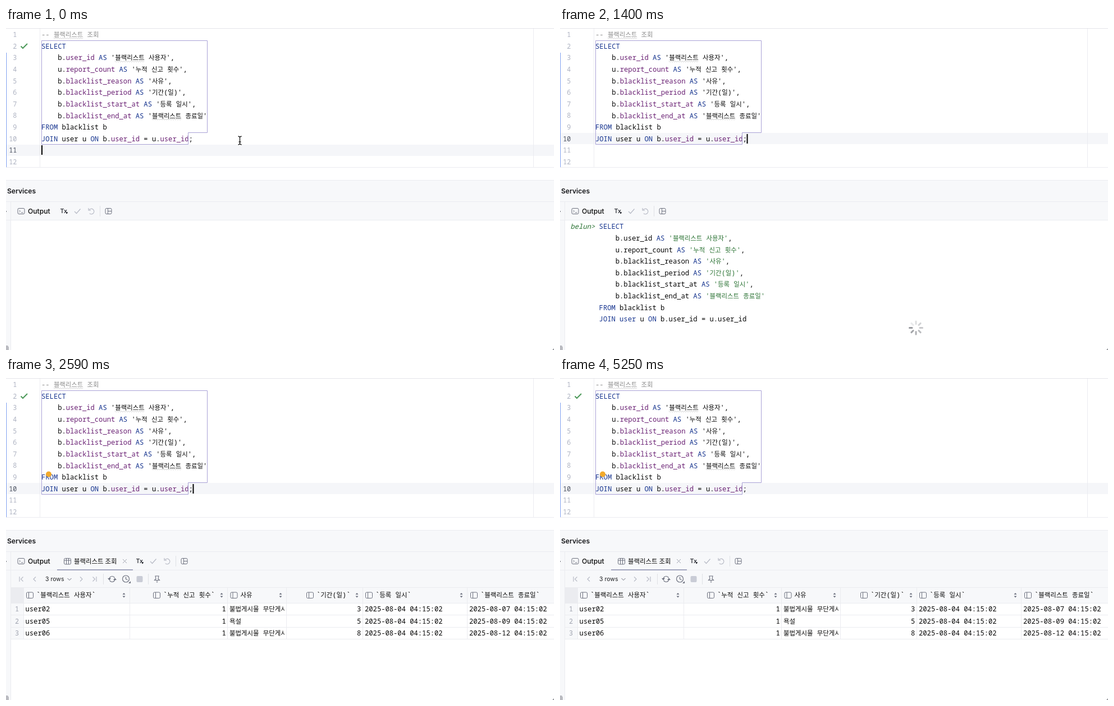
An HTML page with a canvas that plays this animation: 976 px wide and 574 px high, repeating every 5.74 s.

```html
<!DOCTYPE html>
<html lang="ko">
<head>
<meta charset="utf-8">
<style>
html, body { margin: 0; width: 100%; height: 100%; overflow: hidden; background: #fff; }
canvas { display: block; }
</style>
</head>
<body>
<canvas id="stage" width="976" height="574"></canvas>
<script>
const ctx = document.getElementById('stage').getContext('2d');
const LOOP = 5740, STEP = 70, ROW = 20.65, CHAR = 7.3;
const INK = '#080808', KEYWORD = '#17358f', FIELD = '#6a2174', STRING = '#2a7233';
const LINE = '#ebecf0', PANEL = '#f7f8fa', ICON = '#6c707e', FAINT = '#b8bbc6';
const MONO = '"Noto Sans Mono", "DejaVu Sans Mono", monospace';
const HANGUL = '"Noto Sans CJK KR", "Noto Sans CJK JP", "Noto Sans CJK", sans-serif';
const UI = 'Inter, sans-serif';

const select = [
  'SELECT',
  "    b.user_id AS '블랙리스트 사용자',",
  "    u.report_count AS '누적 신고 횟수',",
  "    b.blacklist_reason AS '사유',",
  "    b.blacklist_period AS '기간(일)',",
  "    b.blacklist_start_at AS '등록 일시',",
  "    b.blacklist_end_at AS '블랙리스트 종료일'",
  'FROM blacklist b',
  'JOIN user u ON b.user_id = u.user_id'
];
const records = [
  ['user02', '1', '불법게시물 무단게시', '3', '07'],
  ['user05', '1', '욕설', '5', '09'],
  ['user06', '1', '불법게시물 무단게시', '8', '12']
];

function rect(x, y, w, h, color) {
  ctx.fillStyle = color;
  ctx.fillRect(x, y, w, h);
}

function path(points, color, width = 1, close = false) {
  ctx.beginPath();
  points.forEach(([x, y], i) => i ? ctx.lineTo(x, y) : ctx.moveTo(x, y));
  if (close) ctx.closePath();
  ctx.strokeStyle = color;
  ctx.lineWidth = width;
  ctx.stroke();
}

function shape(points, color) {
  ctx.beginPath();
  points.forEach(([x, y]) => ctx.lineTo(x, y));
  ctx.fillStyle = color;
  ctx.fill();
}

function arc(x, y, r, from, to, color, width = 1) {
  ctx.beginPath();
  ctx.arc(x, y, r, from, to);
  ctx.strokeStyle = color;
  ctx.lineWidth = width;
  ctx.stroke();
}

function box(x, y, w, h, color) {
  ctx.beginPath();
  ctx.roundRect(x, y, w, h, 2);
  ctx.strokeStyle = color;
  ctx.lineWidth = 1;
  ctx.stroke();
}

// Hangul is set a little smaller than Latin; y is the middle of the line. Returns the end x.
function text(str, x, y, color = INK, { family = MONO, size = 12.17, style = '500', align = 'left' } = {}) {
  const runs = str.match(/[가-힣]+|[^가-힣]+/g).map(run => {
    const font = /[가-힣]/.test(run) ? `${style} 11.4px ${HANGUL}` : `${style} ${size}px ${family}`;
    ctx.font = font;
    return { run, font, width: ctx.measureText(run).width };
  });
  if (align === 'right') x -= runs.reduce((sum, r) => sum + r.width, 0);
  ctx.fillStyle = color;
  for (const r of runs) {
    ctx.font = r.font;
    ctx.fillText(r.run, x, y + size * 0.357);
    x += r.width;
  }
  return x;
}

function sql(line, x, y, inOutput) {
  for (const token of line.match(/'[^']*'|\.\w+|\w+|\s+|[^\w\s]/g)) {
    if (token[0] === "'") {
      x = text(token, x, y, inOutput ? STRING : INK);
    } else if (token[0] === '.') {
      x = text('.', x, y);
      x = text(token.slice(1), x, y, inOutput ? INK : FIELD);
    } else {
      const isKey = /^[A-Z]+$/.test(token) || (inOutput && token === 'user');
      x = text(token, x, y, isKey ? KEYWORD : INK);
    }
  }
  return x;
}

function wave(x, y, width) {
  const points = [];
  for (let i = 0; i <= width; i += 2) points.push([x + i, y + (i % 4 ? 1 : -1)]);
  path(points, '#c9c9c9', 0.9);
}

const rowY = i => 11.7 + ROW * i;

function editor(s) {
  rect(0, Math.round(rowY(s.row) - 10.2), 976, 20, '#f5f6f9');
  rect(60, 0, 1, 248, LINE);
  rect(939, 0, 1, 248, LINE);
  rect(0, 248, 976, 1, LINE);
  rect(0, 0, 976, 1, '#e3e4e8');
  rect(0, 44, 1, 204, '#7d9ff0');
  for (let i = 0; i < 12; i++) {
    text(String(i + 1), 19.3, rowY(i), i === s.row ? '#4b5160' : '#aeb3c2',
      { size: 11.8, style: '400', align: 'right' });
  }
  if (s.check) path([[26.5, 32.5], [30, 36], [38, 28]], '#4f9a5b', 2);

  text('-- 블랙리스트 조회', 63, rowY(0), '#8c8c8c', { style: '400' });
  select.forEach((line, i) => sql(i === 8 ? line + ';' : line, 63, rowY(i + 1), false));
  wave(85, 18.5, 52);
  wave(194, 59.8, 52);
  wave(260, 163, 52);

  if (s.frame) {
    path([[63.5, 22.5], [358.5, 22.5], [358.5, 186.5], [324.5, 186.5], [324.5, 207.5], [63.5, 207.5]],
      '#aaa2d6', 1, true);
  }
  if (s.bulb) {
    ctx.beginPath();
    ctx.arc(76, 171.5, 5, 0, Math.PI * 2);
    ctx.fillStyle = '#f2a92c';
    ctx.fill();
  }
  if (s.caret) rect(s.row === 10 ? 63 : 332.5, Math.round(rowY(s.row) - 8.8), 2, 17, '#000');
}

function outputIcon(x, y) {
  box(x - 6, y - 5, 12, 10, ICON);
  path([[x - 3.5, y - 2], [x - 1.5, y], [x - 3.5, y + 2]], ICON);
  path([[x, y + 2.5], [x + 3.5, y + 2.5]], ICON);
}

function gridIcon(x, y) {
  box(x - 6, y - 5, 12, 10.5, ICON);
  path([[x - 6, y - 1.5], [x + 6, y - 1.5]], ICON);
  path([[x - 2, y - 5], [x - 2, y + 5.5]], ICON);
  path([[x + 2, y - 5], [x + 2, y + 5.5]], ICON);
}

function toolbar(dx) {
  const y = 326.5;
  text('Tx', 96.5 + dx, y, '#34363d', { family: UI, size: 10.5, style: '600' });
  shape([[107 + dx, 328], [110 + dx, 328], [109 + dx, 331], [107 + dx, 331]], '#34363d');
  path([[122 + dx, 327], [125.5 + dx, 330.5], [132.5 + dx, 322.5]], FAINT, 1.3);
  arc(152 + dx, y + 0.5, 4.8, -2.5, 2.3, FAINT, 1.2);
  path([[147 + dx, 321], [147 + dx, 324.8], [151 + dx, 324.8]], FAINT, 1.2);
  rect(167 + dx, 317, 1, 19, '#dfe1e5');
  box(177 + dx, 321.5, 11, 10, ICON);
  path([[181.5 + dx, 321.5], [181.5 + dx, 331.5]], ICON);
  path([[181.5 + dx, 326.5], [188 + dx, 326.5]], ICON);
}

function services(withTable) {
  rect(0, 271, 976, 72, PANEL);
  rect(0, 271, 976, 1, LINE);
  rect(0, 309, 976, 1, LINE);
  rect(0, 342, 976, 1, LINE);
  rect(0, 343, 8, 231, PANEL);
  rect(8, 310, 1, 264, LINE);
  rect(0, 326, 1, 2, '#70737c');
  text('Services', 2, 291, '#16171a', { family: UI, size: 12.1, style: '600' });
  outputIcon(27, 326.5);
  text('Output', 39, 326.5, INK, { family: UI, size: 12.1 });
  if (withTable) {
    gridIcon(109.5, 326.5);
    text('블랙리스트 조회', 121, 326.5, INK, { family: UI, size: 12.1 });
    path([[208, 323], [215, 330]], '#9ea2ae');
    path([[215, 323], [208, 330]], '#9ea2ae');
    rect(91, 341, 135, 2, '#a3a6bf');
  }
  toolbar(withTable ? 135 : 0);
}

function chevron(x, y, dir, bar) {
  path([[x - 2 * dir, y - 4], [x + 2 * dir, y], [x - 2 * dir, y + 4]], FAINT, 1.2);
  if (bar) path([[x + 4.5 * dir, y - 4.5], [x + 4.5 * dir, y + 4.5]], FAINT, 1.2);
}

function pager() {
  const y = 358.5;
  chevron(28.5, y, -1, true);
  chevron(51, y, -1);
  text('3 rows', 70, y, '#1e1f22', { family: UI, size: 10.5, style: '400' });
  path([[109.5, 357], [113, 360.5], [116.5, 357]], ICON);
  chevron(134, y, 1);
  chevron(156.5, y, 1, true);
  rect(173, 349, 1, 19, '#dfe1e5');
  rect(253, 349, 1, 19, '#dfe1e5');

  arc(189, y, 5, Math.PI, Math.PI * 1.85, ICON, 1.2);
  arc(189, y, 5, 0, Math.PI * 0.85, ICON, 1.2);
  shape([[181, 357], [187, 357], [184, 360.5]], ICON);
  shape([[191, 360], [197, 360], [194, 356.5]], ICON);
  arc(213.5, 358, 6, 0, Math.PI * 2, ICON, 1.2);
  path([[213.5, 354.5], [213.5, 358.5], [216.5, 360]], ICON, 1.2);
  shape([[222, 362], [222, 366], [218, 366]], ICON);
  ctx.beginPath();
  ctx.roundRect(232.5, 353, 11, 11, 2);
  ctx.fillStyle = '#c9ccd6';
  ctx.fill();
  path([[266, 353], [272, 353], [271, 358], [273.5, 360.5], [264.5, 360.5], [267, 358]], ICON, 1.1, true);
  path([[269, 360.5], [269, 365]], ICON, 1.1);
}

function header(iconX, label, sortX) {
  const y = 387;
  box(iconX + 0.5, 382, 12, 10.5, ICON);
  path([[iconX + 4.5, 382], [iconX + 4.5, 392.5]], ICON);
  text(label, iconX + 18, y);
  if (!sortX) return;
  shape([[sortX - 2.5, 386], [sortX + 2.5, 386], [sortX, 383]], ICON);
  shape([[sortX - 2.5, 388.5], [sortX + 2.5, 388.5], [sortX, 391.5]], ICON);
}

function table() {
  rect(9, 343, 967, 58, PANEL);
  pager();
  rect(9, 374, 22, 27, LINE);
  rect(9, 401, 22, 64, PANEL);
  for (const y of [373, 401, 422, 444, 465]) rect(8, y, 968, 1, LINE);
  for (const x of [31, 220, 394, 499, 635, 821]) rect(x, 373, 1, 93, LINE);
  header(36, '`블랙리스트 사용자`', 210);
  header(262, '`누적 신고 횟수`', 384);
  header(399.5, '사유', 489);
  header(535, '`기간(일)`', 625);
  header(640, '`등록 일시`', 811);
  header(827, '`블랙리스트 종료일`');
  records.forEach(([user, count, reason, days, end], i) => {
    const y = 412 + i * 21.5;
    text(String(i + 1), 23, y, '#a0a4b0', { size: 11.8, style: '400', align: 'right' });
    text(user, 34.5, y);
    text(count, 391.7, y, INK, { align: 'right' });
    ctx.save();
    ctx.beginPath();
    ctx.rect(395, y - 10, 102, 20);
    ctx.clip();
    text(reason, 398, y);
    ctx.restore();
    text(days, 632.3, y, INK, { align: 'right' });
    text('2025-08-04 04:15:02', 639, y);
    text(`2025-08-${end} 04:15:02`, 825, y);
  });
}

function output() {
  text('belun>', 18.5, 354, STRING, { style: 'italic 500' });
  select.forEach((line, i) => sql(line, 18.5 + 7 * CHAR, 354 + i * 20.62, true));
}

function spinner(x, y, shade) {
  ctx.lineCap = 'round';
  for (let i = 0; i < 8; i++) {
    const a = i * Math.PI / 4;
    const c = Math.cos(a), s = Math.sin(a);
    path([[x + 7 * c, y + 7 * s], [x + 11.5 * c, y + 11.5 * s]], `rgba(110,112,118,${shade(i)})`, 3);
  }
  ctx.lineCap = 'butt';
}

function beam(x, y) {
  const strokes = [
    [[x, y - 6], [x, y + 6]],
    [[x - 3, y - 7.5], [x - 1, y - 7], [x, y - 6], [x + 1, y - 7], [x + 3, y - 7.5]],
    [[x - 3, y + 7.5], [x - 1, y + 7], [x, y + 6], [x + 1, y + 7], [x + 3, y + 7.5]],
    [[x - 2, y + 2.5], [x + 2, y + 2.5]]
  ];
  strokes.forEach(p => path(p, '#fff', 3));
  strokes.forEach(p => path(p, '#111', 1.3));
}

function arrow(x, y) {
  const tip = [[0, 0], [0, 15], [3.6, 11.8], [6, 17.3], [8.4, 16.2], [6.1, 10.8], [10.8, 10.8]]
    .map(([a, b]) => [x + a, y + b]);
  path(tip, '#fff', 2, true);
  shape(tip, '#000');
}

function pointer(t) {
  if (t < 1330) {
    const p = Math.min(t / 350, 1);
    beam(416.5 + p + 12 * Math.sin(Math.PI * p), 200.5 - p);
  } else if (t >= 3360 && t < 3710) {
    const p = (t - 3360) / 280;
    const x = 417.5 + 5 * p, y = 199.5 + 353 * p * p * (3 - 2 * p);
    y < 249 ? beam(x, y) : arrow(x, y);
  }
}

function caretOn(t) {
  if (t < 2030) return true;
  return (t >= 2590 && t < 3080) || (t >= 3640 && t < 4130) || (t >= 4690 && t < 5250);
}

function draw(t) {
  const done = t >= 1540;
  rect(0, 0, 976, 574, '#fff');
  editor({
    row: t < 210 ? 10 : 9,
    frame: t < 210 || t >= 560,
    check: t < 1330 || done,
    bulb: (t >= 1190 && t < 1330) || t >= 2310,
    caret: caretOn(t)
  });
  services(done);
  if (done) table();
  else if (t >= 1400) output();

  if (t >= 1400 && !done) {
    const turn = Math.floor((t - 1400) / STEP) + 5;
    spinner(634, 534.5, i => 0.15 + 0.08 * ((i - turn + 16) % 8));
  } else if (done && t < 1960) {
    spinner(649, 534.5, () => t < 1680 ? 0.5 : 0.25);
  }

  shape([[0, 566], [3, 566], [5, 569], [5, 574], [0, 574]], '#b9bac0');
  shape([[976, 571], [976, 574], [973, 574]], '#8d8f96');
  pointer(t);
}

function tick() {
  const t = performance.now() % LOOP;
  draw(Math.floor(t / STEP) * STEP);
  requestAnimationFrame(tick);
}
tick();
</script>
</body>
</html>
```
